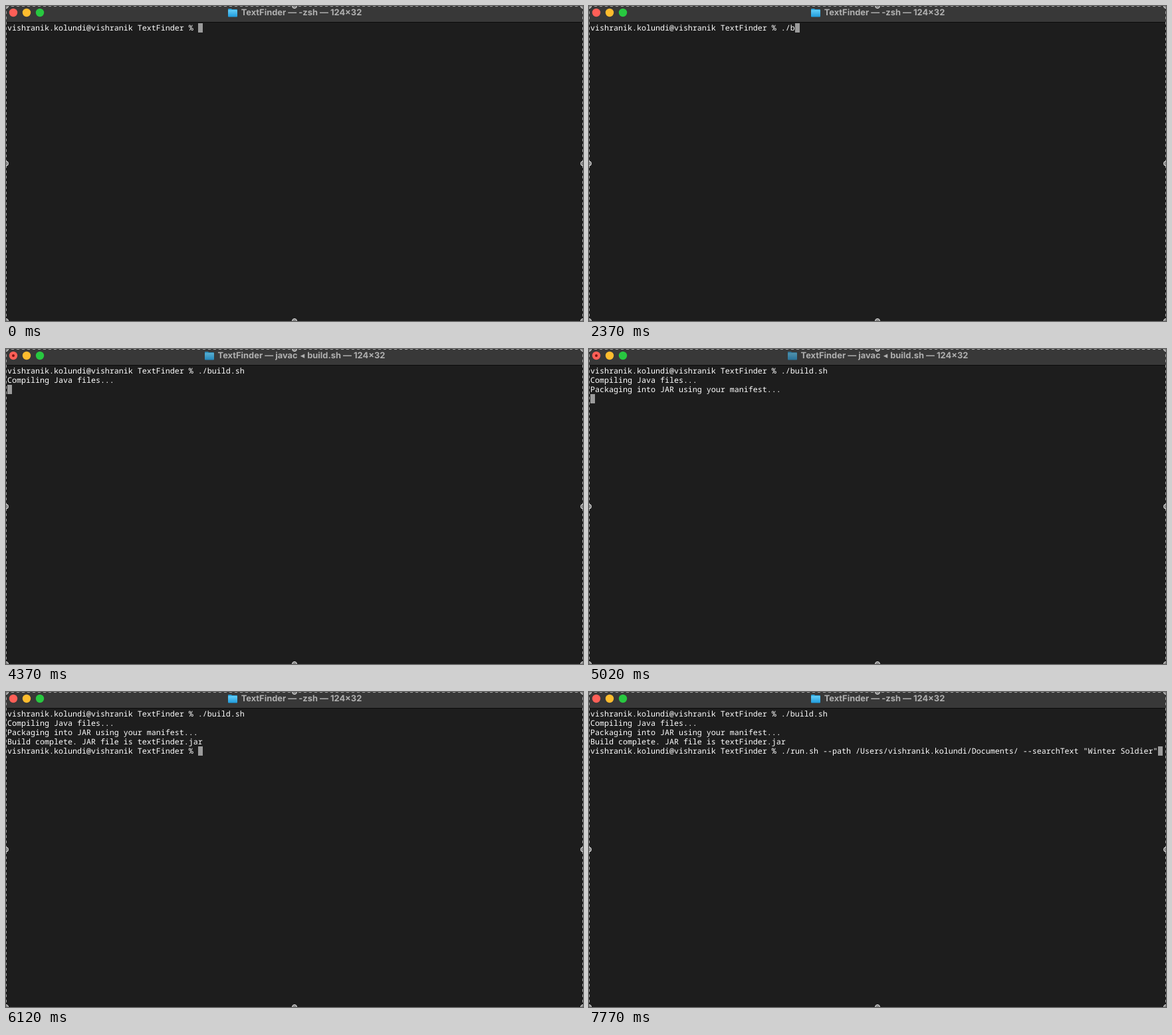
Recreate the animation shown at these times as an HTML page. Size 868 px wide and 475 px high, loop 8 s.

```html
<!DOCTYPE html>
<html lang="en">
<head>
<meta charset="utf-8">
<title>Terminal build</title>
<style>
  html, body { margin: 0; width: 100%; height: 100%; overflow: hidden; background: #1d1d1d; }
  svg { display: block; }
  text { white-space: pre; text-rendering: geometricPrecision; }
  .title { font: 700 12.9px Inter, "DejaVu Sans", sans-serif; fill: #b0b0b0; text-anchor: middle; }
  .mono { font: 500 11.6667px "Noto Sans Mono", "DejaVu Sans Mono", monospace; fill: #fff; }
  .mono.selected { font-weight: 400; fill: #1d1d1d; }
  .dashes { fill: none; stroke: #a2a2a2; stroke-dasharray: 4; }
  .handles circle { fill: #858585; stroke: #e4e4e4; }
</style>
</head>
<body>
<svg width="868" height="475" viewBox="0 0 868 475">
  <defs>
    <linearGradient id="blue" x2="0" y2="1">
      <stop offset="0" stop-color="#62cdf8"/>
      <stop offset="1" stop-color="#1f9bdc"/>
    </linearGradient>
  </defs>
  <rect width="868" height="475" fill="#1d1d1d"/>
  <rect width="868" height="24" fill="#383838"/>
  <rect y="24" width="868" height="1" fill="#0b0b0b"/>

  <circle cx="11" cy="10" r="6.200" fill="#ff5f57"/>
  <circle cx="31" cy="10" r="6.200" fill="#febc2e"/>
  <circle cx="51" cy="10" r="6.200" fill="#28c840"/>
  <circle id="dot" cx="11" cy="10" r="2" fill="#7c1410"/>

  <g id="folder">
    <path d="M0 1Q0 0 1 0H5L6 1H13Q14 1 14 2V6H0Z" fill="#2a9fd6"/>
    <rect y="2" width="14" height="10.500" rx="1" fill="url(#blue)"/>
  </g>
  <text id="title" class="title" x="444.500" y="14"></text>

  <rect id="cursor" width="7" height="14" fill="#9b9b9b"/>
  <rect id="highlight" x="289" y="82" width="567" height="14" fill="#fff"/>
  <g id="lines"></g>
  <text id="command" class="mono" x="289" y="93"></text>

  <path class="dashes" d="M0 .5H868M.5 0V475M867.500 0V475"/>
  <g class="handles">
    <circle cx="0" cy="0" r="3.500"/><circle cx="434" cy="0" r="3.500"/><circle cx="868" cy="0" r="3.500"/>
    <circle cx="0" cy="237.500" r="3.500"/><circle cx="868" cy="237.500" r="3.500"/>
    <circle cx="0" cy="475" r="3.500"/><circle cx="434" cy="475" r="3.500"/><circle cx="868" cy="475" r="3.500"/>
  </g>
</svg>
<script>
  const LOOP = 8000, LEFT = 2, TOP = 26, CELL = 7, ROW = 14, ROWS = 5;
  const first = 'vishranik', user = first + '.kolundi';
  const prompt = `${user}@${first} TextFinder % `;
  const build = './build.sh';
  const keyTimes = [1620, 1870, 2370, 2520, 2720, 2920, 3120, 3320, 3520, 3670];
  const run = `./run.sh --path /Users/${user}/Documents/ --searchText "Winter Soldier"`;
  const output = [
    [4320, ''],
    [4370, 'Compiling Java files...'],
    [5020, 'Packaging into JAR using your manifest...'],
    [5170, 'Build complete. JAR file is textFinder.jar']
  ];
  const PROMPT_BACK = 5220, PASTE = 6770, DESELECT = 7770;

  const el = id => document.getElementById(id);
  const show = (id, on) => el(id).setAttribute('visibility', on ? 'visible' : 'hidden');
  const setText = (node, s) => { if (node.textContent !== s) node.textContent = s; };

  const rows = Array.from({ length: ROWS }, (_, i) => {
    const row = document.createElementNS('http://www.w3.org/2000/svg', 'text');
    row.setAttribute('class', 'mono');
    row.setAttribute('x', LEFT);
    row.setAttribute('y', TOP + 11 + i * ROW);
    return el('lines').appendChild(row);
  });

  function screen(t) {
    const typed = keyTimes.filter(k => t >= k).length;
    const lines = [prompt + build.slice(0, typed)];
    for (const [at, line] of output) if (t >= at && line) lines.push(line);
    if (t >= PROMPT_BACK) lines.push(prompt);
    else if (t >= output[0][0]) lines.push('');
    return lines;
  }

  function drawTitle(t) {
    const busy = t >= 4370 && t < PROMPT_BACK;
    const dim = Math.min(Math.max((t - 4320) / 100, 0), Math.max((5320 - t) / 100, 0), 1);
    // Hair spaces give the small triangle a little more room.
    setText(el('title'), `TextFinder — ${busy ? 'javac \u200a◂\u200a build.sh' : '-zsh'} — 124×32`);
    el('folder').setAttribute('transform', `translate(${busy ? 299 : 334} 4)`);
    el('folder').setAttribute('opacity', 1 - 0.4 * dim);
    show('dot', busy);
  }

  function drawScreen(t) {
    const lines = screen(t), last = lines.length - 1;
    rows.forEach((row, i) => setText(row, lines[i] || ''));
    const pasted = t >= PASTE, selected = pasted && t < DESELECT;
    setText(el('command'), pasted ? run : '');
    el('command').classList.toggle('selected', selected);
    show('highlight', selected);
    const column = lines[last].length + (pasted ? run.length : 0);
    el('cursor').setAttribute('x', LEFT + column * CELL);
    el('cursor').setAttribute('y', TOP + last * ROW);
  }

  function tick() {
    const t = performance.now() % LOOP;
    drawTitle(t);
    drawScreen(t);
    requestAnimationFrame(tick);
  }
  tick();
</script>
</body>
</html>
```
